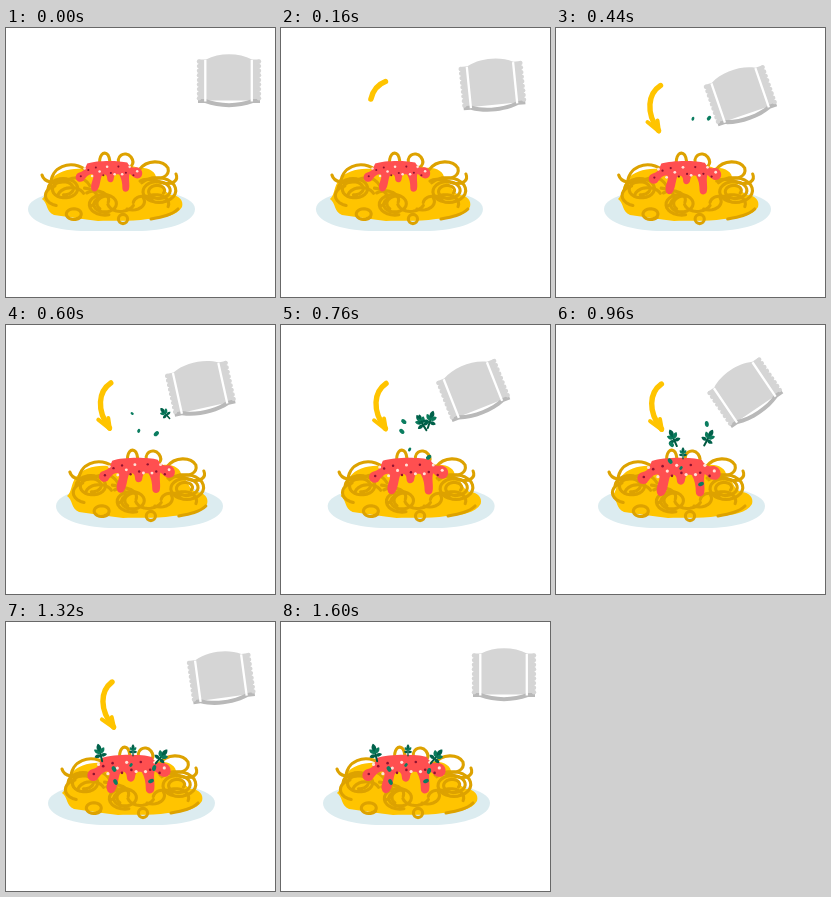
These frames come from a looping animation (269 by 269 pixels, 2.04 s). An HTML page:

```html
<!DOCTYPE html>
<html lang="en">
<head>
<meta charset="utf-8">
<title>Spaghetti with herbs</title>
<style>
html, body { margin: 0; width: 100%; height: 100%; overflow: hidden; background: #fff; }
svg { display: block; width: 100vw; height: 100vh; }
.line { fill: none; stroke-linecap: round; stroke-linejoin: round; }
#noodles { stroke: #dda200; stroke-width: 3.1; }
#arrow { stroke: #ffc400; stroke-width: 5.4; }
#head { stroke-width: 4; }
</style>
</head>
<body>
<svg viewBox="0 0 269 269">
  <defs>
    <g id="leaf"><path class="line" d="M0 9V-3" stroke="#00583f" stroke-width="2"/></g>
    <ellipse id="bit" rx="3" ry="2" fill="#0b7d60"/>
  </defs>

  <path id="plate" fill="#dcecf0" d="M22 181C22 196 55 203 80 203H131C156 203 189 196 189 181C189 167 150 159 105.5 159S22 167 22 181Z"/>
  <path id="mass" fill="#ffc400" d="M36 171C41 167 40 158 45 152C52 143 64 140 77 141C90 135 120 135 132 140C142 139 151 144 150 151C157 154 157 164 165 167C173 167 178 173 176 179C171 188 157 190 142 191C122 194 105 192 92 193C76 191 62 189 48 187C40 184 42 175 36 171Z"/>
  <g id="noodles" class="line">
    <path d="M36 147C38 154 48 157 61 152S80 151 84 158"/>
    <path d="M45 157C44 139 64 131 80 142"/>
    <path d="M94 139C92 127 98 122 102 127C105 132 104 136 103 140"/>
    <path d="M114 139C108 128 119 122 125 129C130 136 124 142 117 140"/>
    <path d="M133 142C141 131 157 132 162 140C164 148 155 152 146 150"/>
    <path d="M170 146C173 153 166 157 157 155S141 149 134 153"/>
    <path d="M145 191C156 189 166 187 172 181"/>
    <circle cx="117" cy="191" r="4.6"/>
  </g>
  <g id="sauce">
    <path fill="#ff4f50" d="M96 136C108 132 135 132 146 135C149 140 152 142 156 141C164 140 168 150 162 154C156 157 152 151 149 149C147 154 150 164 148 169C146 173 140 172 140 167C140 161 139 155 136 150C131 149 130 150 129 156C128 161 121 161 121 155C121 150 117 148 114 152C112 158 112 166 108 170C104 173 100 170 101 163C102 158 105 153 103 150C98 148 94 154 91 158C86 161 80 157 82 151C84 146 90 148 93 143Z"/>
  </g>
  <g id="herbs"></g>
  <g id="arrow" class="line">
    <path id="shaft" pathLength="1" d="M0 0C-12.5 8-15 27-2 45"/>
    <path id="head" d="M-13 36.5L-1.5 46L-3 35"/>
  </g>
  <g id="bag">
    <path fill="#d5d5d5" d="M-30.5-21H-23C-10-28 10-28 23-21H30.5V20H-30.5Z"/>
    <path fill="#b9b9b9" d="M-31 18.5H-23C-10 24 10 24 23 18.5H31V22.5H24C10 28-10 28-24 22.5H-31Z"/>
    <path stroke="#fff" stroke-width="2.3" d="M-23.7-20.5V21M22.8-20.5V21"/>
  </g>
</svg>
<script>
const LOOP = 2040, STEP = 40;
const el = id => document.getElementById(id);

function add(parent, tag, attrs) {
  const node = document.createElementNS('http://www.w3.org/2000/svg', tag);
  for (const k in attrs) node.setAttribute(k, attrs[k]);
  return parent.appendChild(node);
}

let seed = 7;
const rand = () => (seed = seed * 16807 % 2147483647) / 2147483647;

// Progress of t from a to b, and its easings.
const span = (t, a, b) => Math.min(1, Math.max(0, (t - a) / (b - a)));
const out = u => 1 - (1 - u) ** 2;
const smooth = u => u * u * (3 - 2 * u);
const sineOut = u => Math.sin(u * Math.PI / 2);
const swell = u => Math.sin(u * Math.PI);

function place(node, x, y = 0, scale = 1, turn = 0) {
  node.setAttribute('transform', `translate(${x} ${y}) rotate(${turn}) scale(${scale})`);
}
const show = (node, on) => node.setAttribute('visibility', on ? 'visible' : 'hidden');

// An inward spiral noodle, angles in turns.
function curl(cx, cy, r, from, turns, shrink = .28) {
  const points = [];
  for (let k = 0; k <= turns; k += .04) {
    const a = 2 * Math.PI * (from + k), size = r * (1 - shrink * k);
    points.push([cx + size * Math.cos(a), cy + .7 * size * Math.sin(a)].map(n => n.toFixed(1)));
  }
  add(el('noodles'), 'path', { d: 'M' + points.join('L') });
}
curl(152, 163, 20, .6, 2.5);
curl(58, 161, 16, .5, 1.8);
curl(98, 176, 16, .2, 1.5);
curl(68, 186, 8, .1, 1.1, .1);
for (let i = 0; i < 9; i++)
  curl(54 + 12 * i, 167 + 10 * rand(), 10 + 6 * rand(), rand(), .42);

for (let i = 0; i < 16; i++)
  add(el('sauce'), 'circle', {
    cx: 88 + 4.7 * i, cy: 146 + 6 * Math.cos(2.2 * i),
    r: i % 2 ? 1.6 : 1.3, fill: i % 2 ? '#ffe3d8' : '#8e1230'
  });

for (let i = -2; i <= 2; i++)
  add(el('leaf'), 'path', {
    d: 'M0 0C-3.4-2-2.6-6 0-8C2.6-6 3.4-2 0 0Z', fill: i % 2 ? '#0a7a5b' : '#00614a',
    transform: `translate(0 ${2 * Math.abs(i) - 1}) rotate(${46 * i}) scale(${1 - .1 * Math.abs(i)})`
  });

for (let y = -19; y < 19; y += 4.6)
  for (const cx of [-30, 30]) add(el('bag'), 'circle', { cx, cy: y, r: 2.2, fill: '#d5d5d5' });

// Landing x, y, sideways drift, start time, size, final angle, fall time.
const herbs = [
  ['leaf', 94, 130.5, 72, 540, 1, -14, 620],
  ['leaf', 127, 128, 19, 680, .65, 0, 260],
  ['leaf', 155.5, 134.5, -8, 620, 1, 40],
  ['bit', 145, 159, 9, 380, 1, -25],
  ['bit', 125, 143, 14, 360, .7, -50],
  ['bit', 108, 147, 20, 620, 1, 60],
  ['bit', 109.5, 160, 18, 560, 1, 65],
  ['bit', 148, 149, 4, 800, 1, 105]
].map(([kind, ...fall]) => ({ node: add(el('herbs'), 'use', { href: '#' + kind }), fall }));

function drawHerb({ node, fall: [x, y, drift, start, size, turn, time = 540] }, t) {
  const u = span(t, start, start + time), top = 86;
  show(node, u > 0);
  place(node, x + drift * (1 - u), top + (y - top) * u ** 1.3,
    size * Math.min(1, 8 * u), turn - 30 * (1 - u));
}

// Bag poses, each with the easing that leads into it.
const rest = { x: 223, y: 52.5, turn: 0 };
const poses = [
  { at: 0, ...rest },
  { at: 440, x: 184.5, y: 67, turn: -19, ease: smooth },
  { at: 600, x: 194.5, y: 63, turn: -12.5, ease: smooth },
  { at: 960, x: 189, y: 67, turn: -34, ease: smooth },
  { at: 1600, ...rest, ease: sineOut }
];

function drawBag(t) {
  const i = Math.max(1, poses.findIndex(p => t <= p.at));
  const a = poses[t >= 1600 ? 3 : i - 1], b = poses[t >= 1600 ? 4 : i];
  const u = b.ease(span(t, a.at, b.at));
  const mix = k => a[k] + (b[k] - a[k]) * u;
  place(el('bag'), mix('x'), mix('y'), 1, mix('turn'));
}

function drawArrow(t) {
  const swing = 1 - out(span(t, 80, 440)), drift = span(t, 440, 1320);
  const from = span(t, 1340, 1560), to = span(t, 80, 250);
  place(el('arrow'), 104.5 + 1.5 * drift, 57.5 - 6.5 * swing + 2.5 * drift, 1, 20 * swing - 4.5 * drift);
  show(el('shaft'), to > from);
  el('shaft').setAttribute('stroke-dasharray', `${to - from} 3`);
  el('shaft').setAttribute('stroke-dashoffset', -from);
  show(el('head'), to === 1 && from < .9);
}

// Slides right past its place, then settles back.
const slide = t => 28 * out(span(t, 0, 600)) - 8 * smooth(span(t, 600, 960));

function draw(t) {
  const x = slide(t);
  const size = .8 + .2 * span(t, 160, 960);
  place(el('plate'), x);
  place(el('mass'), x - 3 * swell(span(t, 440, 800)));
  place(el('noodles'), slide(t && t + 30) - 3 * swell(span(t, 640, 1320)));
  place(el('sauce'), 102.8 + x - 123 * size, 133 * (1 - size), size);
  herbs.forEach(h => drawHerb(h, t));
  drawArrow(t);
  drawBag(t);
}

const start = performance.now();
function tick() {
  const t = (performance.now() - start) % LOOP;
  draw(Math.floor(t / STEP) * STEP);
  requestAnimationFrame(tick);
}
tick();
</script>
</body>
</html>
```
